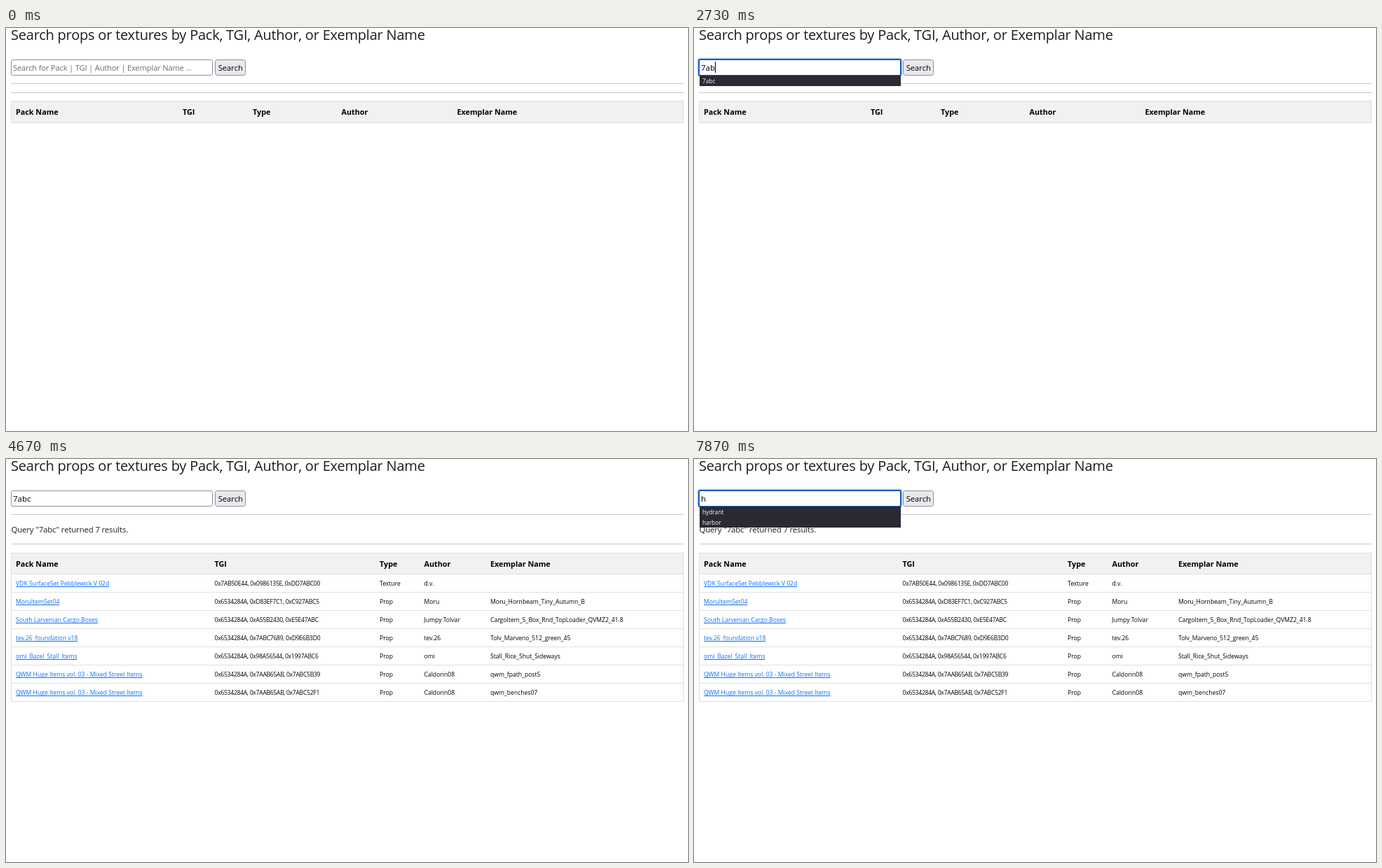
An HTML page with a canvas that plays this animation: 973x576 px, repeating every 8000 ms.

```html
<!DOCTYPE html>
<html lang="en">
<head>
<meta charset="utf-8">
<title>Prop search</title>
<style>
  html, body { margin: 0; width: 100%; height: 100%; overflow: hidden; background: #fff; }
  canvas { display: block; }
</style>
</head>
<body>
<canvas id="stage" width="973" height="576"></canvas>
<script>
const ctx = document.getElementById('stage').getContext('2d');
const LOOP = 8000;
const FONT = '"Open Sans", "Noto Sans", sans-serif';
const INK = '#1a1d20';

const HEADS = ['Pack Name', 'TGI', 'Type', 'Author', 'Exemplar Name'];
const COLS_EMPTY = [14, 252, 352, 478.5, 643.5];
const COLS_FULL = [14, 297.5, 533, 596.5, 691];

const ROWS = [
  ['VDK SurfaceSet Pebblewick V 02d', '0x7AB50E44, 0x0986135E, 0xDD7ABC00', 'Texture', 'd.v.', ''],
  ['MoruItemSet04', '0x6534284A, 0xD83EF7C1, 0xC927ABC5', 'Prop', 'Moru', 'Moru_Hornbeam_Tiny_Autumn_B'],
  ['South Larvenian Cargo Boxes', '0x6534284A, 0xA55B2430, 0xE5E47ABC', 'Prop', 'Jumpy Tolvar', 'CargoItem_5_Box_Rnd_TopLoader_QVMZ2_41.8'],
  ['tev.26_foundation v18', '0x6534284A, 0x7ABC7689, 0xD9E6B3D0', 'Prop', 'tev.26', 'Tolv_Marveno_512_green_45'],
  ['omi_Bazel_Stall_Items', '0x6534284A, 0x98A56544, 0x1997ABC6', 'Prop', 'omi', 'Stall_Rice_Shut_Sideways'],
  ['QWM Huge Items vol. 03 - Mixed Street Items', '0x6534284A, 0x7AAB65AB, 0x7ABC5B39', 'Prop', 'Caldorin08', 'qwm_fpath_post5'],
  ['QWM Huge Items vol. 03 - Mixed Street Items', '0x6534284A, 0x7AAB65AB, 0x7ABC52F1', 'Prop', 'Caldorin08', 'qwm_benches07']
];

const START = {
  text: '', hover: false, focus: false, caret: false, selected: false,
  list: [], pad: 0, button: 'idle', results: false
};

// Each step changes part of the state from its time on.
const STEPS = [
  [1070, { hover: true }],
  [1270, { focus: true, caret: true }],
  [1800, { caret: false }],
  [2330, { caret: true }],
  [2400, { text: '7' }],
  [2470, { list: ['7abc', '7a20', '7700'], pad: 3 }],
  [2530, { pad: 0 }],
  [2600, { text: '7a' }],
  [2670, { list: ['7abc'] }],
  [2730, { text: '7ab' }],
  [2870, { text: '7abc' }],
  [3400, { caret: false }],
  [4000, { caret: true, hover: false }],
  [4130, { button: 'hover' }],
  [4330, { focus: false, caret: false, list: [], button: 'active' }],
  [4470, { button: 'hover' }],
  [4670, { results: true, button: 'idle' }],
  [4730, { button: 'hover' }],
  [5200, { button: 'idle', hover: true }],
  [6800, { focus: true, caret: true }],
  [6930, { selected: true, caret: false }],
  [7000, { list: ['7abc'] }],
  [7670, { text: 'h', selected: false, list: [] }],
  [7730, { list: ['hydrant', 'harbor'], pad: 3 }],
  [7870, { pad: 0 }]
];

const BUTTON = {
  idle: ['#e9e9ed', '#8f8f9d'],
  hover: ['#d0d0d7', '#676774'],
  active: ['#b1b1b9', '#484851']
};

function stateAt(t) {
  const s = { ...START };
  for (const [at, patch] of STEPS) if (t >= at) Object.assign(s, patch);
  return s;
}

function write(str, x, y, size, { color = '#000', weight = 400, gap = 0 } = {}) {
  ctx.font = `${weight} ${size}px ${FONT}`;
  ctx.letterSpacing = gap + 'px';
  ctx.fillStyle = color;
  ctx.fillText(str, x, y);
  return ctx.measureText(str).width;
}

function rect(x, y, w, h, color) {
  ctx.fillStyle = color;
  ctx.fillRect(x, y, w, h);
}

function rounded(x, y, w, h, r, fill, line) {
  ctx.beginPath();
  ctx.roundRect(x, y, w, h, r);
  ctx.fillStyle = fill;
  ctx.fill();
  if (!line) return;
  ctx.strokeStyle = line;
  ctx.lineWidth = 1;
  ctx.stroke();
}

function rule(y, color = '#c8c9ca') {
  rect(7, y, 960, 1, color);
}

function drawInput(s) {
  if (s.focus) {
    rounded(4.5, 42.5, 293, 27, 4, '#bfd7f7');
    rounded(6, 44, 290, 25, 3, '#1259c3');
    rounded(8, 46, 286, 21, 1, '#fff');
  } else {
    rounded(7.5, 45.5, 287, 22, 2, '#fff', s.hover ? '#5b5b66' : '#8f8f9d');
  }
  if (!s.text) {
    write('Search for Pack | TGI | Author | Exemplar Name ...', 10, 60.5, 11.1, { color: '#6d6d6d', gap: -0.15 });
  }
  ctx.font = `400 11.5px ${FONT}`;
  ctx.letterSpacing = '0px';
  const w = ctx.measureText(s.text).width;
  if (s.selected) rect(10, 48, w, 16, '#0078d7');
  write(s.text, 10, 60.5, 11.5, { color: s.selected ? '#fff' : '#000' });
  if (s.caret) rect(Math.round(10 + w), 48, 1, 16, '#000');
}

function drawButton(s) {
  const [fill, line] = BUTTON[s.button];
  rounded(298.5, 45.5, 43, 22, 3, fill, line);
  write('Search', 302.7, 60.5, 11.2);
}

function drawList(s) {
  if (!s.list.length) return;
  rect(8, 68, 287, 15 * s.list.length + s.pad, '#2b2a33');
  s.list.forEach((item, i) => write(item, 12, 79 + 15 * i, 8.3, { color: '#fbfbfe' }));
}

function drawHead(y, h, cols) {
  rect(7, y, 960, h, '#dee0e1');
  rect(8, y + 1, 958, h - 2, '#f1f1f1');
  HEADS.forEach((name, i) => write(name, cols[i], y + 19.5, 10.8, { weight: 700 }));
}

function drawResults() {
  write('Query "7abc" returned 7 results.', 7.5, 105, 11.4, { color: INK, gap: -0.14 });
  rule(121);
  drawHead(134, 31, COLS_FULL);
  ROWS.forEach((row, i) => {
    const y = 181 + 26 * i;
    row.forEach((cell, c) => {
      const color = c ? '#000' : '#0d6efd';
      // The code column is set tighter than the words.
      const gap = c === 1 ? -0.28 : 0;
      const w = write(cell, COLS_FULL[c], y, 8.6, { color, gap, weight: 500 });
      if (!c) rect(14, y + 1, w, 1, color);
    });
    rule(190 + 26 * i, '#dee0e1');
  });
  rect(7, 164, 1, 183, '#dee0e1');
  rect(966, 164, 1, 183, '#dee0e1');
}

function draw(t) {
  const s = stateAt(t);
  rect(0, 0, 973, 576, '#fff');
  write('Search props or textures by Pack, TGI, Author, or Exemplar Name', 7, 17, 20, { color: INK, gap: -0.215 });
  rule(79);
  if (s.results) {
    drawResults();
  } else {
    rule(92);
    drawHead(104, 32, COLS_EMPTY);
  }
  drawInput(s);
  drawButton(s);
  drawList(s);
}

function tick() {
  draw(performance.now() % LOOP);
  requestAnimationFrame(tick);
}
tick();
</script>
</body>
</html>
```
